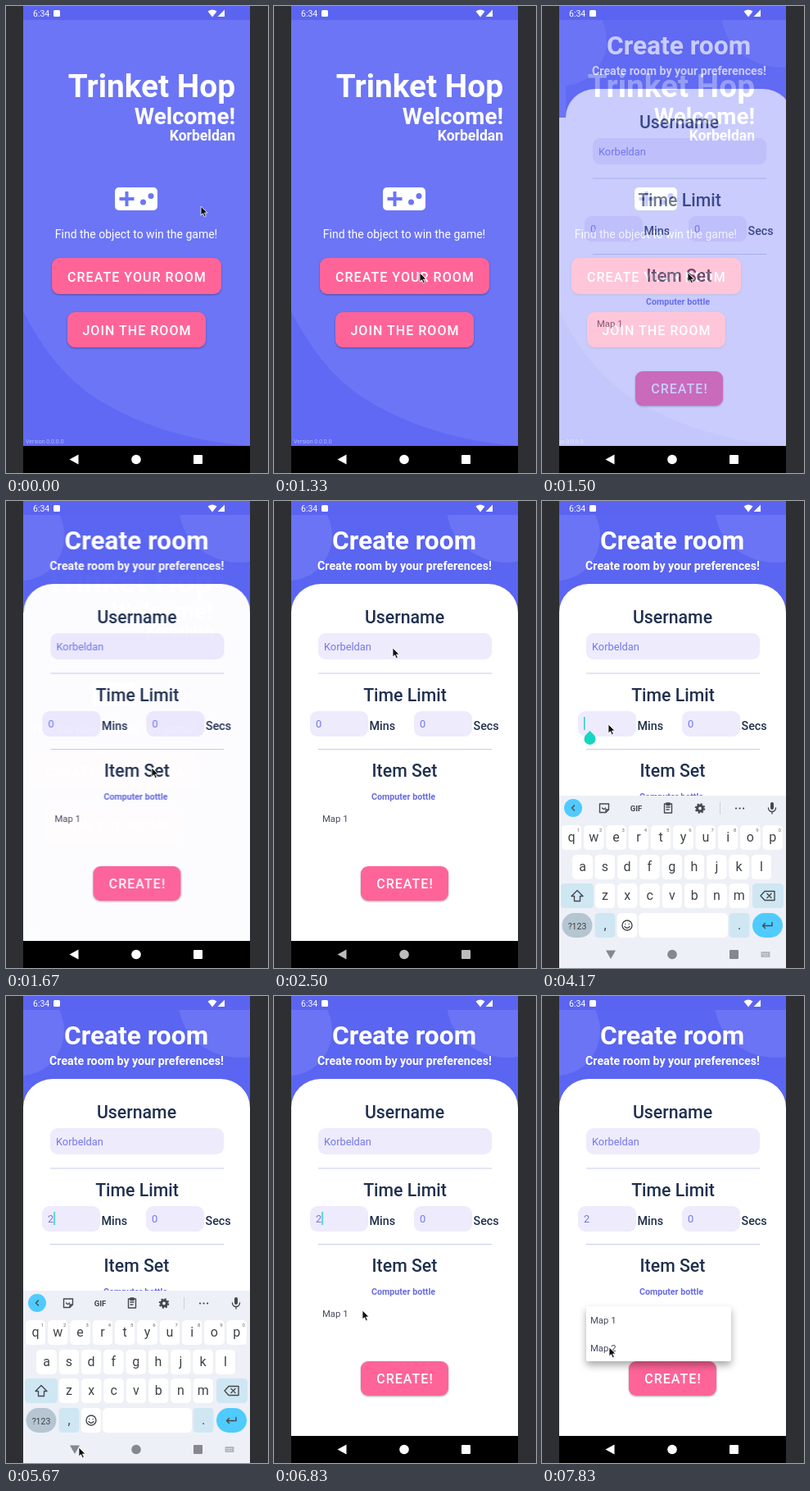
An HTML page for the animation above (8000 ms loop, 320 px wide and 569 px high).

```html
<!DOCTYPE html>
<html lang="en">
<head>
<meta charset="utf-8">
<title>Room setup</title>
<style>
  html, body { margin: 0; width: 100%; height: 100%; overflow: hidden; background: #2e2f33; }
  svg { display: block; width: 100vw; height: 100vh; }
  text { font-family: Roboto, sans-serif; }
  .bold { font-weight: 700; }
  .mid { text-anchor: middle; }
  .end { text-anchor: end; }
  .white { fill: #fff; }
  .button rect { fill: #ff6499; filter: drop-shadow(0 1px 1px #0005); }
  .button text { fill: #fff; font-size: 16px; font-weight: 500; letter-spacing: 1.05px; text-anchor: middle; }
  .heading { fill: #20304f; font-size: 21.3px; font-weight: 500; text-anchor: middle; }
  .unit { fill: #20304f; font-size: 14.3px; font-weight: 500; }
  .field { fill: #eeebfd; }
  .value { fill: #7377ec; font-size: 12.8px; }
  .item { fill: #444a5c; font-size: 11.3px; }
  .rule { stroke: #c6cee9; }
  .key { fill: #fff; filter: drop-shadow(0 .6px .3px #0002); }
  .soft { fill: #cfe7f3; }
  .letter { fill: #3f4347; font-size: 16px; text-anchor: middle; }
  .digit { fill: #666; font-size: 6px; text-anchor: middle; }
  .icon { fill: none; stroke: #45494e; stroke-width: 1.4; stroke-linejoin: round; stroke-linecap: round; }
</style>
</head>
<body>
<svg viewBox="0 0 320 569" preserveAspectRatio="none">
  <defs>
    <clipPath id="phone"><rect x="21" width="277" height="569"/></clipPath>
    <clipPath id="screen"><rect x="21" y="17" width="277" height="519"/></clipPath>
  </defs>
  <rect width="320" height="569" fill="#2e2f33"/>
  <g clip-path="url(#phone)">
    <rect x="21" width="277" height="536" fill="#6c75f6"/>
    <path d="M21 372Q58 445 110 478Q190 528 298 536H21Z" fill="#5f69f3"/>

    <g clip-path="url(#screen)">
      <g id="home">
        <text class="white bold end" x="280" y="111" font-size="38.8">Trinket Hop</text>
        <text class="white bold end" x="280" y="144" font-size="27.8">Welcome!</text>
        <text class="white bold end" x="280" y="164" font-size="17.5">Korbeldan</text>
        <rect class="white" x="133" y="221" width="52" height="28" rx="5"/>
        <path d="M147.500 226V244M138.500 235H156.500" stroke="#6c75f6" stroke-width="4"/>
        <circle cx="167.500" cy="239" r="3.500" fill="#6c75f6"/>
        <circle cx="177" cy="231.500" r="3.500" fill="#6c75f6"/>
        <text class="white mid" x="159" y="282.500" font-size="14">Find the object to win the game!</text>
        <g class="button"><rect x="56" y="307" width="207" height="44" rx="9"/><text x="160" y="335.500">CREATE YOUR ROOM</text></g>
        <g class="button"><rect x="75" y="373" width="169" height="43" rx="9"/><text x="160" y="400.500">JOIN THE ROOM</text></g>
        <text x="24" y="533" font-size="7" fill="#b5b9fa">Version 0.0.0.0</text>
      </g>

      <g id="room">
        <rect x="21" width="300" height="180" fill="#5a65f1"/>
        <ellipse cx="18" cy="42" rx="53" ry="55" fill="#6a74f4"/>
        <ellipse cx="285" cy="8" rx="74" ry="67" fill="#6a74f4"/>
        <path d="M-20 136H21A36 35 0 0 1 57 101H262A36 35 0 0 1 298 136H340V536H-20Z" fill="#fff"/>
        <text class="white bold mid" x="159" y="59" font-size="31.700">Create room</text>
        <text class="white bold mid" x="159.500" y="84" font-size="14.200">Create room by your preferences!</text>
        <text class="heading" x="159.500" y="149">Username</text>
        <rect class="field" x="54" y="161" width="212" height="32" rx="9"/>
        <text class="value" x="61" y="181.500">Korbeldan</text>
        <path class="rule" d="M54 210H266M54 302.500H266"/>
        <text class="heading" x="160" y="244">Time Limit</text>
        <rect class="field" x="44" y="256" width="71" height="31" rx="9"/>
        <text class="value" id="zero" x="51" y="276">0</text>
        <text class="value" id="two" x="51" y="276">2</text>
        <rect id="caret" x="51" y="263" width="1.500" height="16" fill="#26cfc4"/>
        <path id="handle" d="M58.500 280L63.500 285A7 7 0 1 1 53.500 285Z" fill="#16d6c0"/>
        <text class="unit" x="116.500" y="279">Mins</text>
        <rect class="field" x="171" y="256" width="71" height="31" rx="9"/>
        <text class="value" x="178" y="276">0</text>
        <text class="unit" x="243.500" y="279">Secs</text>
        <text class="heading" x="159.500" y="336">Item Set</text>
        <text class="bold mid" x="158" y="364" font-size="10.700" fill="#676be2">Computer bottle</text>
        <text class="item" x="59" y="391">Map 1</text>
        <g class="button"><rect x="106" y="445" width="107" height="42" rx="9"/><text class="bold" x="160" y="472">CREATE!</text></g>
        <g id="menu">
          <rect x="54" y="378" width="177" height="67" rx="2" fill="#fff" style="filter:drop-shadow(0 5px 5px #0005)"/>
          <text class="item" x="59" y="399">Map 1</text>
          <text class="item" x="59" y="433">Map 2</text>
        </g>
      </g>
    </g>

    <rect x="21" width="277" height="17" fill="#5b64f0"/>
    <text class="white" x="33" y="13" font-size="10.500">6:34</text>
    <rect class="white" x="58" y="5" width="8" height="8" rx="1.500"/>
    <path class="white" d="M246.500 6.500Q252 2.500 257.500 6.500L252 13.500ZM267 4.500V13H258.500Z"/>

    <rect x="21" y="536" width="277" height="33" fill="#000"/>
    <g id="nav">
      <path d="M77.500 552.500L88.500 546.500V558.500Z"/>
      <circle cx="159" cy="552.500" r="5.800"/>
      <rect x="229" y="547" width="11" height="11" rx="1"/>
    </g>

    <g id="keyboard">
      <rect x="21" y="359" width="277" height="212" fill="#eef0f7"/>
      <circle cx="38" cy="374" r="11" fill="#4fcbff"/>
      <g class="icon">
        <path d="M39.500 371L36.500 374L39.500 377"/>
        <path d="M70.500 369H81.500V376L78 379.500H70.500ZM78 379.500V376H81.500M73.500 374Q75.500 377 77.500 374"/>
        <path d="M149.500 369H158.500V380H149.500ZM152 368H156V370.500H152ZM152 373H156M152 376H155"/>
        <circle cx="193" cy="374.500" r="3.400" stroke-width="3"/>
        <circle cx="193" cy="374.500" r="5.300" stroke-width="2" stroke-dasharray="2.100 2.060" stroke-linecap="butt"/>
        <path d="M281 369V374" stroke-width="4"/>
        <path d="M276.500 374A4.500 4.500 0 0 0 285.500 374M281 378.500V381"/>
        <path d="M237 374.500H237.100M241.500 374.500H241.600M246 374.500H246.100" stroke-width="2.200"/>
      </g>
      <text class="bold mid" x="115" y="378" font-size="9.500" fill="#3f4347">GIF</text>
      <path d="M217.500 367V382" stroke="#cdd1d8"/>
      <g id="keys"></g>
      <g class="icon">
        <path d="M43 474.500L50 481.500H46.500V487.500H39.500V481.500H36Z"/>
        <path d="M272 475.500H284V486.500H272L267 481ZM275 478.500L280 483.500M280 478.500L275 483.500"/>
        <circle cx="104" cy="517" r="6"/>
        <path d="M101.800 515.500V515.600M106.200 515.500V515.600M101 518.500Q104 522 107 518.500"/>
        <path d="M281 513.500V517.500H269.500M272.500 514.500L269.500 517.500L272.500 520.500"/>
      </g>
      <g fill="#85888c">
        <path d="M78 547.500H90L84 558Z"/>
        <circle cx="159" cy="552.500" r="5.800"/>
        <rect x="229" y="547" width="11" height="11" rx="1"/>
      </g>
      <rect x="267.500" y="549" width="11" height="7" rx="1" fill="#b4b7bc"/>
      <path d="M269 551.500H277M270.500 554H275.500" stroke="#eef0f7" stroke-dasharray="1 1"/>
    </g>
  </g>
  <path id="pointer" d="M0 0V11L2.500 8.700L4.300 12.700L6.300 11.800L4.500 8H8Z" fill="#111" stroke="#fff" stroke-width=".8"/>
</svg>
<script>
const LOOP = 8000;
const byId = id => document.getElementById(id);
const move = (x, y = 0) => `translate(${x}px, ${y}px)`;

function add(parent, tag, attrs, label = '') {
  const node = document.createElementNS('http://www.w3.org/2000/svg', tag);
  for (const name in attrs) node.setAttribute(name, attrs[name]);
  node.textContent = label;
  parent.append(node);
  return node;
}

function buildKeys() {
  const keys = byId('keys');
  const key = (x, y, width, label = '', look = 'key', size = 16, rx = 4.5) => {
    const box = add(keys, 'rect', { x: x - width / 2, y: y - 15, width, height: 30, rx, class: look });
    const text = add(keys, 'text', { x, y: y + 5, class: 'letter' }, label);
    text.style.fontSize = size + 'px';
    return box;
  };
  const rows = [['qwertyuiop', 36, 410], ['asdfghjkl', 49.5, 446], ['zxcvbnm', 77, 481]];
  for (const [letters, left, y] of rows) {
    [...letters].forEach((letter, i) => {
      const x = left + i * 27.3;
      key(x, y, 25, letter);
      if (y === 410) add(keys, 'text', { x: x + 8.5, y: 403, class: 'digit' }, (i + 1) % 10);
    });
  }
  key(43, 481, 40, '', 'soft');
  key(276, 481, 38, '', 'soft');
  key(43, 517, 37, '?123', '', 10.5, 15).setAttribute('fill', '#b5c5d1');
  key(77, 517, 25, ',', 'soft');
  key(104, 517, 25);
  key(172.5, 517, 109);
  key(241, 517, 25, '.', 'soft');
  key(275.5, 517, 37, '', '', 16, 15).setAttribute('fill', '#4fcbff');
}

// Each step is [time in ms, value]; the last value holds to the end of the loop.
function play(id, property, steps, easing = 'linear') {
  const all = [...steps, [LOOP, steps.at(-1)[1]]];
  const frames = all.map(([time, value]) => ({ offset: time / LOOP, [property]: value, easing }));
  byId(id).animate(frames, { duration: LOOP, iterations: Infinity });
}
const cut = (id, property, steps) => play(id, property, steps, 'steps(1, end)');

buildKeys();

play('home', 'transform', [[0, move(0)], [1335, move(0)], [1500, move(-20)], [1680, move(-28)]]);
play('room', 'transform', [[0, move(28)], [1335, move(28)], [1500, move(8)], [1680, move(0)]]);
play('room', 'opacity', [[0, 0], [1335, 0], [1500, 0.63], [1680, 1]]);

play('keyboard', 'transform', [
  [0, move(0, 212)], [3300, move(0, 212)], [3600, move(0)], [5880, move(0)], [6130, move(0, 212)]
], 'ease-out');
cut('nav', 'fill', [[0, '#fff'], [1700, '#bcbcbc'], [6000, '#fff']]);

cut('zero', 'opacity', [[0, 1], [4100, 0]]);
cut('two', 'opacity', [[0, 0], [4600, 1]]);
cut('handle', 'opacity', [[0, 0], [3250, 1], [4300, 0]]);
cut('caret', 'transform', [[0, move(7.3)], [4100, move(0)], [4600, move(7.3)]]);
cut('caret', 'opacity', [
  [0, 0], [3250, 1], [3750, 0], [4100, 1], [5100, 0], [5600, 1], [6100, 0], [6600, 1], [7100, 0]
]);

play('menu', 'opacity', [[0, 0], [7450, 0], [7650, 1]]);

play('pointer', 'transform', [
  [0, move(238, 244)], [250, move(238, 244)], [900, move(178, 325)], [1750, move(178, 325)],
  [2400, move(145, 179)], [2600, move(145, 179)], [3100, move(81, 272)], [4850, move(81, 272)],
  [5550, move(89, 550)], [6050, move(89, 550)], [6750, move(108, 383)], [7400, move(108, 383)],
  [7800, move(82, 428)]
], 'ease-in-out');
</script>
</body>
</html>
```
